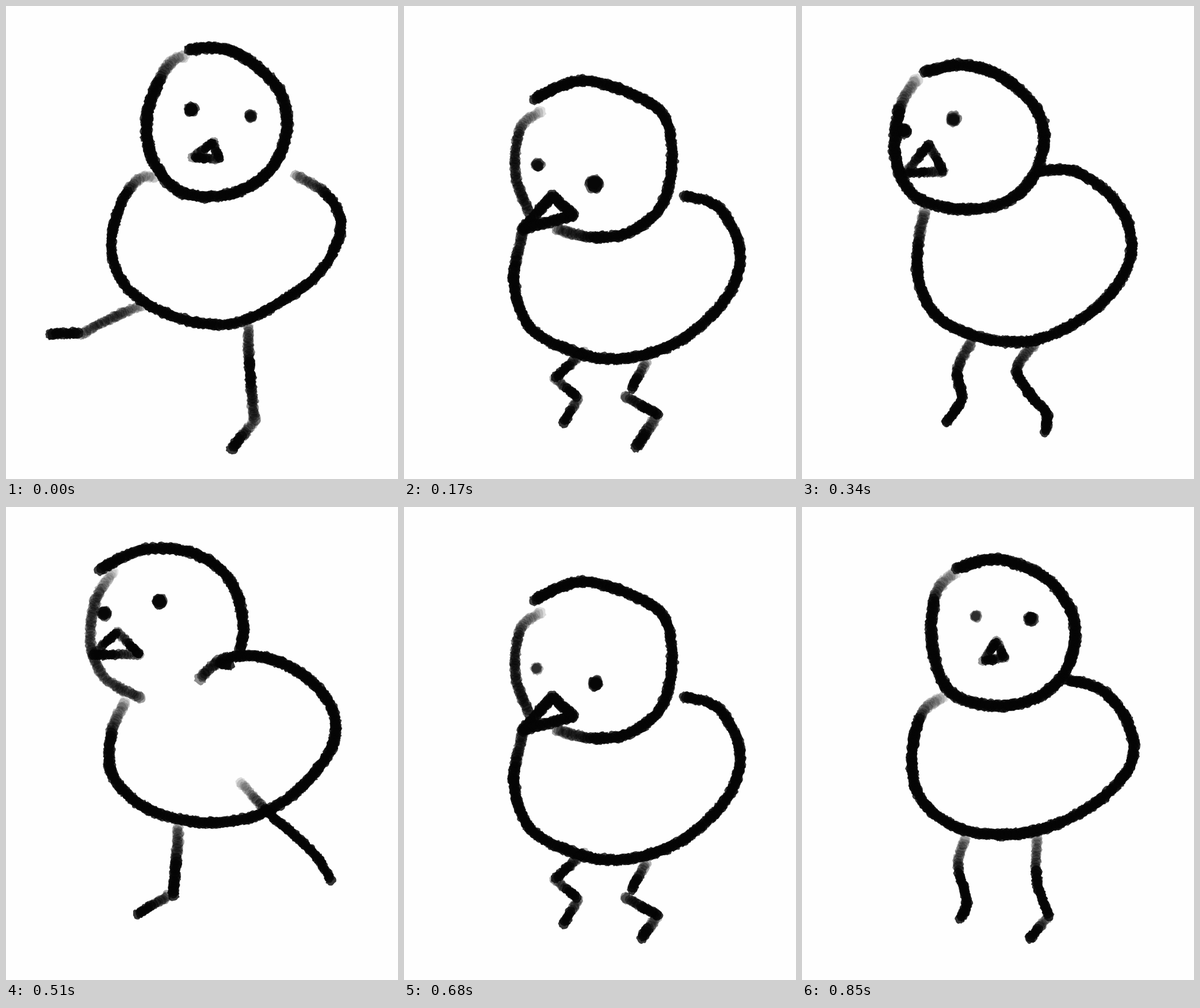
An HTML page with a canvas that plays this animation: 681x823 px, repeating every 1020 ms.

```html
<!DOCTYPE html>
<html lang="en">
<head>
<meta charset="utf-8">
<title>Wobbling chick</title>
<style>
  html, body { margin: 0; width: 100%; height: 100%; overflow: hidden; background: #fefefe; }
  canvas { display: block; width: 681px; height: 823px; }
</style>
</head>
<body>
<canvas id="stage" width="681" height="823"></canvas>
<script>
const ctx = document.getElementById('stage').getContext('2d');
const STEP = 170;   // ms per pose
const GAP = 4;      // distance between dabs
const FADE = 55;    // length over which a stroke end fades
let seed = 1;

function rand() {
  seed = (seed * 16807) % 2147483647;
  return seed / 2147483647;
}
const spread = n => (rand() * 2 - 1) * n;
const parse = path => path.split(' ').map(p => p.split(',').map(Number));

// One ragged dab of the brush
function dab(x, y, r, alpha) {
  const sides = 20;
  ctx.fillStyle = `rgba(5,5,5,${alpha})`;
  ctx.beginPath();
  for (let i = 0; i < sides; i++) {
    const a = i / sides * Math.PI * 2;
    const d = r * (1 + spread(0.13));
    ctx.lineTo(x + Math.cos(a) * d, y + Math.sin(a) * d);
  }
  ctx.fill();
}

// Catmull-Rom curve through the points, in steps of GAP
function sample(points) {
  const out = [points[0]];
  let [px, py] = points[0];
  for (let i = 0; i < points.length - 1; i++) {
    const b = points[i], c = points[i + 1];
    const a = points[i - 1] || b, d = points[i + 2] || c;
    for (let t = 0.01; t <= 1; t += 0.01) {
      const [x, y] = [0, 1].map(j => b[j] + 0.5 * t * (c[j] - a[j]
        + t * (2 * a[j] - 5 * b[j] + 4 * c[j] - d[j]
        + t * (3 * b[j] - a[j] - 3 * c[j] + d[j]))));
      if (Math.hypot(x - px, y - py) >= GAP) {
        out.push([x, y]);
        [px, py] = [x, y];
      }
    }
  }
  return out;
}

// Brush stroke of a given opacity; head and tail are the opacities at its ends
function brush(points, width, head = 1, tail = 1, ink = 1) {
  seed = 7 + points[0][0] * 31 + points[0][1] * 977;
  const dabs = sample(points);
  const reach = Math.min(FADE / GAP, dabs.length / 2);
  dabs.forEach(([x, y], i) => {
    const near = Math.min(1, i / reach);
    const far = Math.min(1, (dabs.length - 1 - i) / reach);
    const level = Math.min(ink, head + (1 - head) * near, tail + (1 - tail) * far, 0.9995);
    const alpha = 1 - Math.pow(1 - level, GAP / width);
    dab(x + spread(1), y + spread(1), width / 2 * (1 + spread(0.08)), alpha);
  });
}

const stroke = (path, ...style) => brush(parse(path), ...style);

// Straight strokes from corner to corner
function zigzag(path, width, ink) {
  const p = parse(path);
  for (let i = 1; i < p.length; i++) brush([p[i - 1], p[i]], width, ink, 1);
}

function beak(path, width, ink) {
  zigzag(path + ' ' + path.split(' ')[0], width, ink);
}

function eye(x, y, r, ink = 0.7) {
  seed = 11 + x * 53 + y * 389;
  for (let i = 0; i < 5; i++) dab(x + spread(1.5), y + spread(2), r * (1.08 - i * 0.07), ink);
}

function kickLeft() {
  stroke('318,76 360,73 405,84 470,140 488,210 460,284 390,327 305,324 254,265 246,185 280,106 310,86', 21, 1, 0.6);
  stroke('503,294 558,329 582,385 550,457 485,510 395,552 300,543 215,495 183,425 197,350 230,302 262,298', 19, 0.75, 0.45);
  stroke('236,522 200,535 160,555 130,572', 18, 0.6, 0.8, 0.9);
  stroke('78,571 128,569', 19);
  stroke('421,558 422,610 429,700 434,722', 19, 0.85, 0.9);
  stroke('432,722 392,770', 19, 0.75);
  eye(322, 180, 12);
  eye(425, 191, 10.5, 0.5);
  beak('325,264 360,237 371,266', 17, 0.9);
}

function crouch() {
  stroke('227,162 268,141 318,130 390,151 448,187 466,255 450,342 395,392 325,402 262,386', 20, 1, 0.9);
  stroke('218,361 193,290 203,212 240,182', 19, 1, 0.5, 0.97);
  beak('258,330 207,388 294,364', 20, 1);
  stroke('488,330 548,352 584,430 560,508 480,582 385,613 300,603 220,560 191,480 207,390', 20, 1, 0.95);
  zigzag('312,602 262,648 303,682 276,728', 18, 0.8);
  zigzag('420,620 394,668', 18, 0.8);
  zigzag('385,680 444,712', 19, 0.95);
}

function crouchLow() {
  crouch();
  zigzag('438,715 404,767', 20, 0.8);
  eye(232, 277, 11, 0.5);
  eye(331, 309, 15, 0.6);
}

function crouchHigh() {
  crouch();
  zigzag('438,715 411,752', 19, 0.8);
  eye(230, 280, 10, 0.3);
  eye(333, 307, 12);
}

function turn() {
  stroke('212,115 280,103 355,128 415,195 412,275 365,335 280,354 195,330 162,260 171,175 200,126', 21, 1, 0.6);
  stroke('412,288 475,288 545,340 573,415 548,485 485,545 400,582 310,577 235,540 202,475 204,400 214,355', 20, 1, 0.85);
  stroke('294,584 270,635 277,685 248,727', 19, 0.85);
  stroke('404,588 373,632 400,680 425,710 422,743', 19, 0.8);
  eye(177, 217, 12);
  eye(263, 197, 12, 0.5);
  beak('181,290 220,241 246,289', 17, 0.9);
}

function kickRight() {
  stroke('163,108 240,74 330,82 392,132 412,205 406,250', 20);
  stroke('186,112 155,165 147,240 175,300 236,333', 19, 0.4, 0.95, 0.9);
  stroke('338,298 375,266 440,260 510,288 564,345 567,415 505,495 425,540 330,548 240,522 185,465 183,395 206,340', 20, 0.95, 0.6);
  zigzag('372,272 390,276', 18, 1);
  stroke('299,558 297,600 290,680', 19, 0.8);
  zigzag('282,676 228,709', 18, 0.85);
  stroke('408,480 460,535 532,600 565,650', 18, 0.5);
  eye(170, 185, 12, 0.6);
  eye(267, 164, 12.5);
  beak('152,257 193,217 232,257', 17, 0.85);
}

function stand() {
  stroke('268,107 340,91 425,125 472,195 463,275 415,328 340,346 258,322 226,240 233,150 268,112', 21, 1, 0.5);
  stroke('460,300 525,322 570,385 570,450 510,515 430,556 350,570 265,556 205,505 191,435 208,360 246,330', 20, 1, 0.45);
  stroke('284,578 271,625 286,685 274,720', 18, 0.7);
  stroke('408,575 408,650 430,713', 18, 0.7);
  zigzag('426,715 395,751', 19, 0.75);
  eye(302, 190, 10, 0.3);
  eye(397, 194, 12, 0.6);
  beak('315,268 338,234 352,262', 17, 0.9);
}

const poses = [kickLeft, crouchLow, turn, kickRight, crouchHigh, stand];
const start = performance.now();
let shown = -1;

function draw() {
  const i = Math.floor((performance.now() - start) / STEP) % poses.length;
  if (i !== shown) {
    shown = i;
    ctx.fillStyle = '#fefefe';
    ctx.fillRect(0, 0, 681, 823);
    poses[i]();
  }
  requestAnimationFrame(draw);
}
draw();
</script>
</body>
</html>
```
